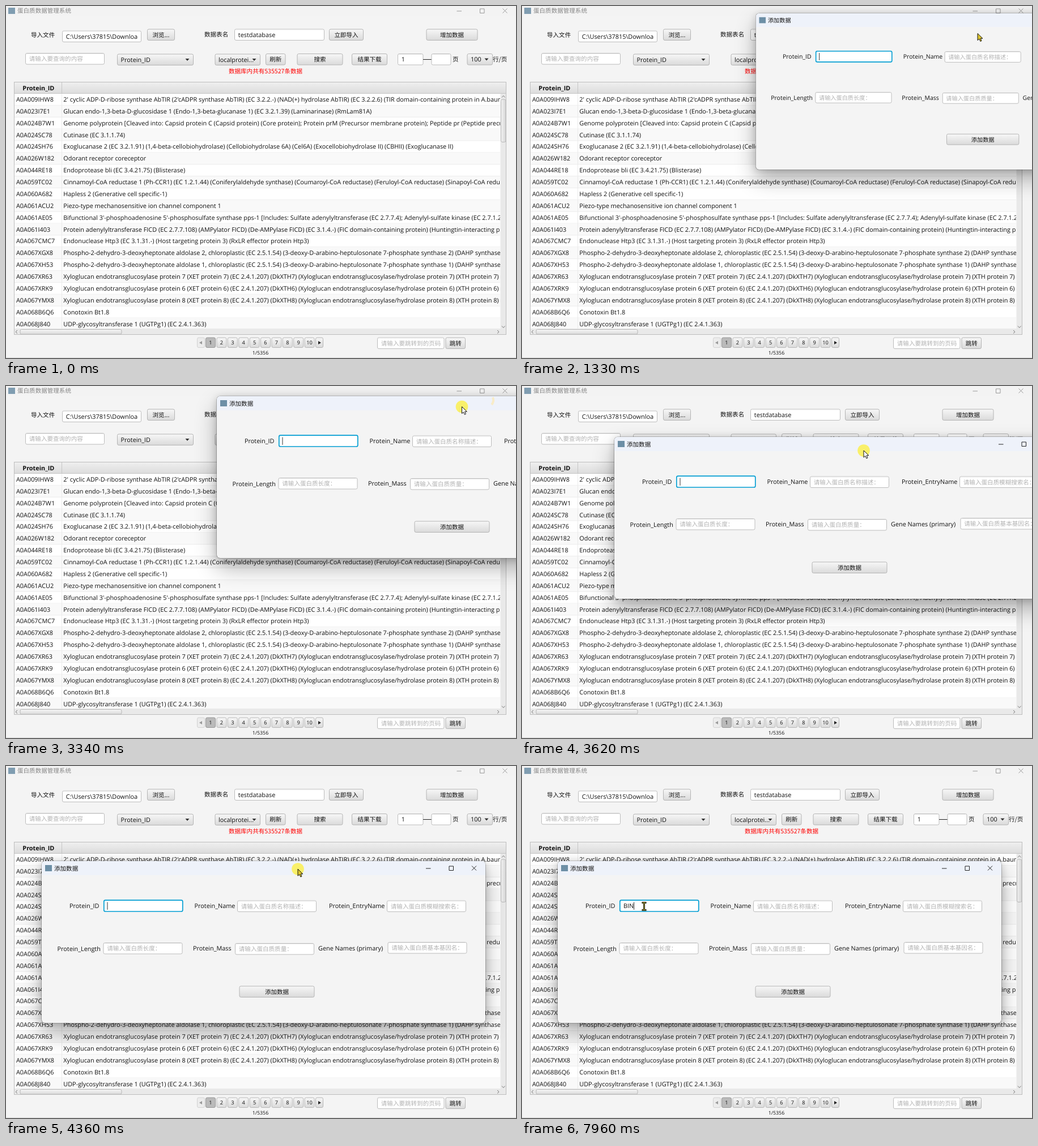
An HTML page for the animation above (8 s loop, 900 by 622 pixels).

```html
<!DOCTYPE html>
<html lang="zh">
<head>
<meta charset="utf-8">
<title>蛋白质数据管理系统</title>
<style>
  html, body { margin: 0; width: 100%; height: 100%; overflow: hidden; background: #f4f4f4; }
  #stage { position: relative; width: 100%; height: 100%; max-width: 900px; max-height: 622px;
           overflow: hidden; contain: paint; }
  svg, #dialog { position: absolute; left: 0; top: 0; display: block; }
  text { font-family: "Open Sans", "Noto Sans", sans-serif; font-size: 10.87px; fill: #111;
         text-rendering: geometricPrecision; white-space: pre; }
  text.cjk { font-family: "Noto Sans CJK SC", "Noto Sans CJK", sans-serif; font-size: 10.55px; }
  #dialog { width: 783px; height: 286px; border-radius: 6px; overflow: hidden; background: #f4f4f4;
            box-shadow: 0 0 0 .6px rgba(0,0,0,.35), 0 2px 14px rgba(0,0,0,.18), 0 18px 38px rgba(0,0,0,.3); }
</style>
</head>
<body>
<div id="stage">
<svg id="main" width="900" height="622">
  <defs>
    <linearGradient id="btn" x2="0" y2="1"><stop stop-color="#f7f7f7"/><stop offset="1" stop-color="#dadada"/></linearGradient>
    <linearGradient id="head" x2="0" y2="1"><stop stop-color="#f0f0f0"/><stop offset="1" stop-color="#dcdcdc"/></linearGradient>
    <linearGradient id="thumb" x2="1" y2="0"><stop stop-color="#f2f2f2"/><stop offset="1" stop-color="#d6d6d6"/></linearGradient>
    <clipPath id="pathClip"><rect x="100" y="44" width="132.5" height="20"/></clipPath>
    <clipPath id="cellClip"><rect x="99" y="155" width="773" height="415"/></clipPath>
  </defs>
</svg>
<div id="dialog"><svg id="form" width="783" height="286"></svg></div>
<svg id="pointer" width="900" height="622">
  <path id="trail" d="M857 33Q862 27 859 20" fill="none" stroke="#f8ecc8" stroke-width="4"/>
  <g id="cursor">
    <circle id="halo" r="10.8" fill="#f9f06a"/>
    <path id="arrow" d="M0 0V12.2L2.9 9.6L4.9 14L7 13L5.1 8.8H8.9Z" stroke="#111" stroke-width="1"/>
    <g id="beam" fill="none">
      <path d="M-4 -6.5H4M-4 6.5H4M0 -6.5V6.5" stroke="#151515" stroke-width="3"/>
      <path d="M-3.3 -6.5H3.3M-3.3 6.5H3.3M0 -6.5V6.5" stroke="#b5a92c" stroke-width="1"/>
    </g>
  </g>
</svg>
</div>
<script>
const $ = id => document.getElementById(id);
let layer = $('main');

function add(tag, attrs, parent = layer) {
  const el = document.createElementNS('http://www.w3.org/2000/svg', tag);
  for (const k in attrs) el.setAttribute(k, attrs[k]);
  return parent.appendChild(el);
}
function text(x, y, s, attrs = {}) {
  const el = add('text', { x, y, ...attrs });
  if (/[\u4e00-\u9fff]/.test(s)) el.classList.add('cjk');
  el.textContent = s;
  return el;
}
const rect = (x, y, width, height, fill, more = {}) => add('rect', { x, y, width, height, fill, ...more });
const line = (d, stroke, width = 1) => add('path', { d, stroke, 'stroke-width': width, fill: 'none' });
const solid = (d, fill) => add('path', { d, fill });
const box = (x, y, w, h, fill, stroke = '#b4b4b4', rx = 2.5) =>
  rect(x + .5, y + .5, w - 1, h - 1, fill, { stroke, rx });

function button(x, y, w, label, h = 20.5) {
  box(x, y, w, h, 'url(#btn)');
  text(x + w / 2, y + h / 2 + 4, label, { 'text-anchor': 'middle' });
}
function field(x, y, w, value = '', hint = false) {
  box(x, y, w, 20.5, '#fff', '#bcbcbc');
  line(`M${x + 2} ${y + 1.5}h${w - 4}`, '#ececec');
  text(x + 6.8, y + 14.3, value, hint ? { style: 'fill:#b2b2b2' } : {});
}
function combo(x, y, w, label) {
  box(x, y, w, 20.5, 'url(#btn)');
  text(x + 6.5, y + 14, label);
  solid(`M${x + w - 14.5} ${y + 8.6}h7l-3.5 4z`, '#333');
}
function windowButtons(x, y, color) {
  line(`M${x - 4.5} ${y + .5}h8.5M${x + 36.5} ${y - 3.5}h7.5v7.5h-7.5zM${x + 76.5} ${y - 4}l8 8m0 -8l-8 8`, color);
}

// Main window
rect(0, 0, 900, 622, '#f4f4f4');
rect(0, 0, 900, 17, '#f3f3f3');
const icon = rect(4, 3, 12, 11, '#6d8fa6');
const title = text(20, 12, '蛋白质数据管理系统');
windowButtons(800, 8.5, '#999');

text(44, 54.5, '导入文件');
field(99, 43.5, 140);
text(105.8, 58, 'C:\\Users\\37815\\Downloads', { 'clip-path': 'url(#pathClip)' });
button(249, 40.5, 49, '浏览...');
text(350, 54, '数据表名');
field(403, 40.5, 159, 'testdatabase');
button(570, 40.5, 61, '立即导入');
button(741.5, 40.5, 91, '增加数据');
field(34, 83, 140, '请输入要查询的内容', true);
combo(196, 84.5, 135, 'Protein_ID');
combo(368.5, 84.5, 80.5, 'localprotei...');
button(458, 84, 35.5, '刷新');
button(513.5, 84, 81, '搜索');
button(610, 84, 63, '结果下载');
field(691, 84, 45.5, '1');
line('M736 94.5h15', '#222');
field(750.5, 84, 35, '');
text(788, 97.5, '页');
combo(813.5, 84, 45.5, '100');
text(859, 98, '行/页');
text(458, 119, '数据库内共有535527条数据', { 'text-anchor': 'middle', style: 'fill:#f00' });

// Table
const rows = `A0A009IHW8|2' cyclic ADP-D-ribose synthase AbTIR (2'cADPR synthase AbTIR) (EC 3.2.2.-) (NAD(+) hydrolase AbTIR) (EC 3.2.2.6) (TIR domain-containing protein in A.baumannii)
A0A023I7E1|Glucan endo-1,3-beta-D-glucosidase 1 (Endo-1,3-beta-glucanase 1) (EC 3.2.1.39) (Laminarinase) (RmLam81A)
A0A024B7W1|Genome polyprotein [Cleaved into: Capsid protein C (Capsid protein) (Core protein); Protein prM (Precursor membrane protein); Peptide pr (Peptide precursor);
A0A024SC78|Cutinase (EC 3.1.1.74)
A0A024SH76|Exoglucanase 2 (EC 3.2.1.91) (1,4-beta-cellobiohydrolase) (Cellobiohydrolase 6A) (Cel6A) (Exocellobiohydrolase II) (CBHII) (Exoglucanase II)
A0A026W182|Odorant receptor coreceptor
A0A044RE18|Endoprotease bli (EC 3.4.21.75) (Blisterase)
A0A059TC02|Cinnamoyl-CoA reductase 1 (Ph-CCR1) (EC 1.2.1.44) (Coniferylaldehyde synthase) (Coumaroyl-CoA reductase) (Feruloyl-CoA reductase) (Sinapoyl-CoA reductase)
A0A060A682|Hapless 2 (Generative cell specific-1)
A0A061ACU2|Piezo-type mechanosensitive ion channel component 1
A0A061AE05|Bifunctional 3'-phosphoadenosine 5'-phosphosulfate synthase pps-1 [Includes: Sulfate adenylyltransferase (EC 2.7.7.4); Adenylyl-sulfate kinase (EC 2.7.1.25)]
A0A061I403|Protein adenylyltransferase FICD (EC 2.7.7.108) (AMPylator FICD) (De-AMPylase FICD) (EC 3.1.4.-) (FIC domain-containing protein) (Huntingtin-interacting protein E)
A0A067CMC7|Endonuclease Htp3 (EC 3.1.31.-) (Host targeting protein 3) (RxLR effector protein Htp3)
A0A067XGX8|Phospho-2-dehydro-3-deoxyheptonate aldolase 2, chloroplastic (EC 2.5.1.54) (3-deoxy-D-arabino-heptulosonate 7-phosphate synthase 2) (DAHP synthase 2)
A0A067XH53|Phospho-2-dehydro-3-deoxyheptonate aldolase 1, chloroplastic (EC 2.5.1.54) (3-deoxy-D-arabino-heptulosonate 7-phosphate synthase 1) (DAHP synthase 1)
A0A067XR63|Xyloglucan endotransglucosylase protein 7 (XET protein 7) (EC 2.4.1.207) (DkXTH7) (Xyloglucan endotransglucosylase/hydrolase protein 7) (XTH protein 7)
A0A067XRK9|Xyloglucan endotransglucosylase protein 6 (XET protein 6) (EC 2.4.1.207) (DkXTH6) (Xyloglucan endotransglucosylase/hydrolase protein 6) (XTH protein 6)
A0A067YMX8|Xyloglucan endotransglucosylase protein 8 (XET protein 8) (EC 2.4.1.207) (DkXTH8) (Xyloglucan endotransglucosylase/hydrolase protein 8) (XTH protein 8)
A0A068B6Q6|Conotoxin Bt1.8
A0A068J840|UDP-glycosyltransferase 1 (UGTPg1) (EC 2.4.1.363)`.split('\n');
const rowH = 20.87;
rect(15, 155, 868, 415, '#fff');
rows.forEach((row, i) => {
  const y = 155 + i * rowH, [id, name] = row.split('|');
  if (i % 2) rect(15, y, 857, rowH, '#f9f9f9');
  line(`M15 ${y + rowH - .5}H872`, '#ededed');
  text(18, y + 14, id);
  const cell = add('g', { 'clip-path': 'url(#cellClip)' });
  cell.append(text(101.3, y + 14, name));
});
line('M98.5 155V570', '#ebebeb');
rect(15, 134, 868, 21, 'url(#head)');
line('M98.5 134V155M15 154.5H883', '#c6c6c6');
text(57.3, 149, 'Protein_ID', { 'text-anchor': 'middle', 'font-weight': 'bold' });

// Scroll bars
rect(872.5, 155, 10, 415, '#e9e9e9');
rect(15, 570, 868, 10.5, '#e9e9e9');
box(873, 164.5, 9.5, 76.5, 'url(#thumb)', '#b8b8b8');
box(24.5, 571, 180, 9.5, 'url(#btn)', '#b8b8b8');
line('M875 161.5l2.8 -3l2.8 3M875 565.5l2.8 3l2.8 -3M20 573l-3 2.8l3 2.8M867 573l3 2.8l-3 2.8', '#777');
rect(14.5, 134.5, 868, 446, 'none', { stroke: '#bdbdbd' });

// Pagination
const small = size => ({ 'text-anchor': 'middle', style: `font-size:${size}px` });
box(337, 585.5, 14, 18.5, '#ececec', '#d2d2d2');
solid('M346 592v6l-5 -3z', '#999');
for (let i = 0; i < 10; i++) {
  const x = 352 + i * 19.4;
  box(x, 585.5, 18, 18.5, i ? 'url(#btn)' : '#bababa', i ? '#b8b8b8' : '#999');
  text(x + 9, 598.3, String(i + 1), small(9.2));
}
box(546, 585.5, 14, 18.5, 'url(#btn)');
solid('M551 592v6l5 -3z', '#222');
text(449, 616.3, '1/5356', small(8.8));
field(655, 585.5, 118.5, '请输入要跳转到的页码', true);
button(775.5, 585.5, 35.5, '跳转');
line('M0 621.5H900', '#dcdcdc');

// Dialog
layer = $('form');
rect(0, 0, 783, 25, '#eef2fa');
rect(6, 7, 12, 11, '#6d8fa6');
text(22, 16.6, '添加数据');
windowButtons(682.5, 12.5, '#222');
text(49, 83, 'Protein_ID');
rect(109.8, 69.2, 139, 19.8, '#fff', { rx: 2.5, stroke: '#039ed3', 'stroke-width': 1.7 });
const typed = text(116, 83, '');
const caret = rect(0, 72.5, 1, 13.5, '#333');
text(269.5, 83, 'Protein_Name');
field(345, 69.5, 140, '请输入蛋白质名称描述：', true);
text(507, 83, 'Protein_EntryName');
field(609, 69.5, 140, '请输入蛋白质模糊搜索名：', true);
text(27.5, 159, 'Protein_Length');
field(108.5, 144, 140, '请输入蛋白质长度：', true);
text(267, 158.4, 'Protein_Mass');
field(341, 145, 140, '请输入蛋白质质量：', true);
text(488, 158.4, 'Gene Names (primary)');
field(610.5, 143, 140, '请输入蛋白质基本基因名：', true);
button(348.5, 220.5, 133, '添加数据');

// Motion tables: time, then values
const LOOP = 8000;
const pointerKeys = [
  [120, 868, 610], [320, 826, 420], [520, 784, 230], [720, 767, 96], [920, 798, 47], [1060, 804, 48.5],
  [2110, 804, 48.5], [2430, 832, 35], [2740, 850.5, 22], [3140, 850.5, 22], [3340, 804.5, 36.5],
  [3620, 603, 114], [3890, 529, 189], [3960, 524, 190], [4360, 515, 182], [4560, 515, 182],
  [4700, 372, 214], [4830, 190, 245], [4920, 112, 247], [5030, 206, 247], [5230, 206, 247], [5310, 215.5, 248]];
const dialogKeys = [
  [3140, 399, 8], [3340, 372, 18], [3620, 163, 90], [3890, 78, 176], [3960, 72, 177], [4360, 63, 168]];
const openKeys = [[1260, .92, .6], [1330, .965, 1], [1400, .985, 1], [1470, 1, 1]];

// Moves between keys in even steps of about 70 ms, as a screen capture does.
function at(keys, t) {
  if (t <= keys[0][0]) return keys[0].slice(1);
  const i = keys.findIndex(k => k[0] > t);
  if (i < 0) return keys.at(-1).slice(1);
  const a = keys[i - 1], b = keys[i], span = b[0] - a[0];
  const n = Math.max(1, Math.round(span / 70));
  const f = Math.floor((t - a[0]) / span * n) / n;
  return a.slice(1).map((v, j) => v + (b[j + 1] - v) * f);
}
const within = (t, a, b) => t >= a && t < b;
const show = (el, on) => { el.style.visibility = on ? 'visible' : 'hidden'; };

function draw(t) {
  const active = within(t, 990, 1260);
  title.style.fill = active ? '#222' : '#858585';
  icon.style.opacity = active ? 1 : .85;

  const dialog = $('dialog'), [dx, dy] = at(dialogKeys, t), [scale, alpha] = at(openKeys, t);
  dialog.style.display = t >= 1260 ? 'block' : 'none';
  dialog.style.transform = `translate(${Math.round(dx)}px,${Math.round(dy)}px) scale(${scale})`;
  dialog.style.opacity = alpha;

  const value = t < 7490 ? '' : t < 7690 ? 'B' : t < 7960 ? 'BI' : 'BIN';
  if (typed.textContent !== value) typed.textContent = value;
  caret.setAttribute('x', 115.5 + (value ? typed.getComputedTextLength() + .3 : 0));
  show(caret, t >= 7290 || Math.floor((t - 1260) / 500) % 2 === 0);

  const [px, py] = at(pointerKeys, t);
  const pressed = within(t, 3140, 4560), inField = t >= 5030;
  $('cursor').setAttribute('transform', `translate(${px} ${py})`);
  show($('arrow'), t >= 120 && !inField);
  show($('beam'), inField);
  show($('halo'), pressed || within(t, 990, 1130));
  show($('trail'), within(t, 3270, 3410));
  $('arrow').setAttribute('fill', within(t, 3140, 4300) ? '#fff' : '#dcc42c');
}

const start = performance.now();
function frame() {
  draw((performance.now() - start) % LOOP);
  requestAnimationFrame(frame);
}
frame();
</script>
</body>
</html>
```
